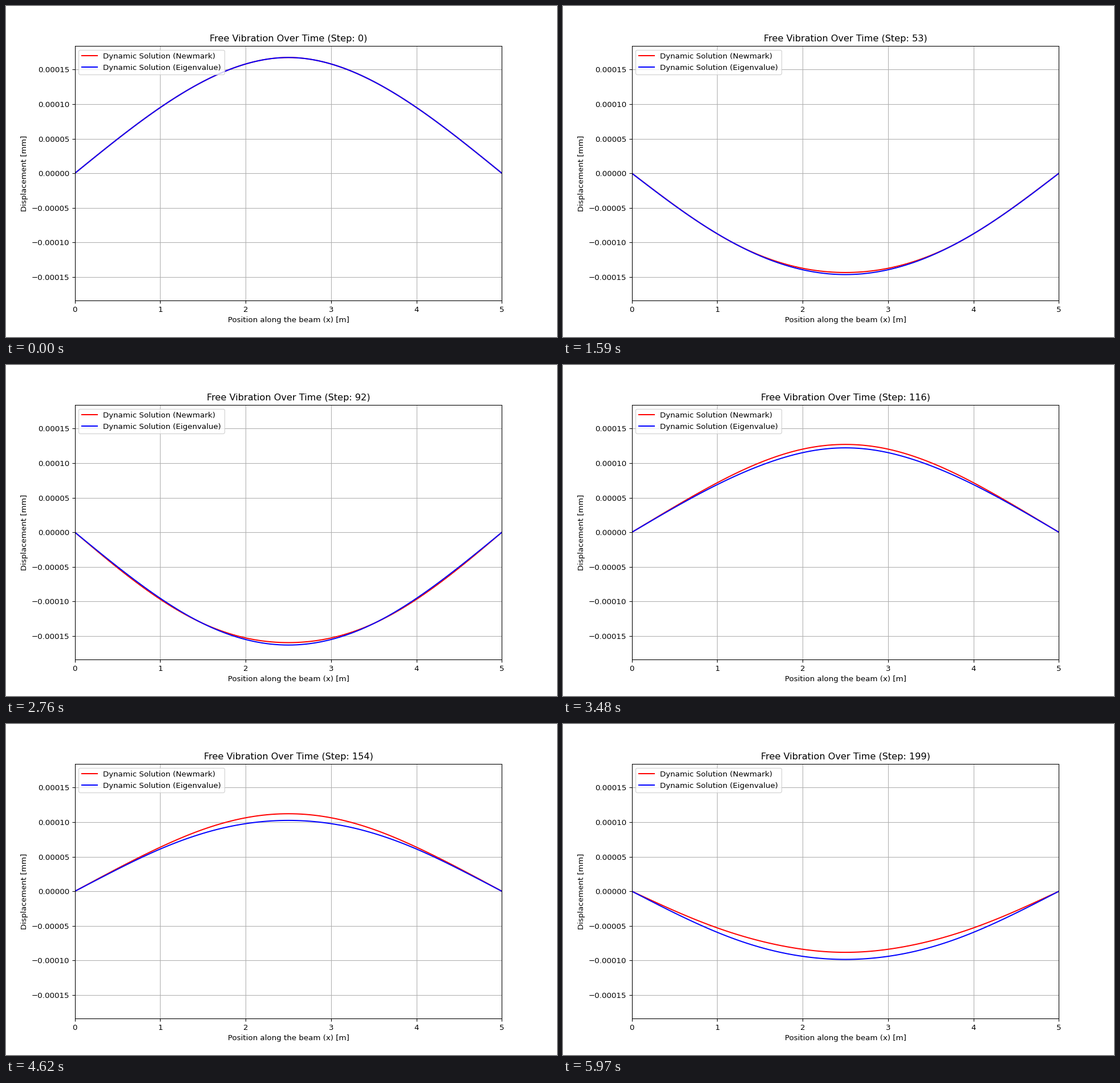
Animation, 966 px wide and 580 px high, one loop 6000 ms. Source, as a matplotlib script:

```python
import numpy as np
import matplotlib.pyplot as plt
from matplotlib.animation import FuncAnimation

plt.rcParams["font.family"] = "DejaVu Sans"

WIDTH, HEIGHT, DPI = 966, 580, 96.6
LENGTH = 5.0
PEAK = 1.675e-4      # midspan deflection under the released point load
PERIOD = 37.175      # first natural period, in time steps
STEPS = 200

x = np.linspace(0, LENGTH, 101)
modes = np.arange(1, 20, 2)

# Modal amplitudes of a simply supported beam with a midspan load
amps = PEAK * 96 / np.pi**4 * np.sin(modes * np.pi / 2) / modes**4
shapes = amps[:, None] * np.sin(np.outer(modes, np.pi * x / LENGTH))

exact = 2 * np.pi / PERIOD * modes**2
# Average-acceleration time stepping lowers each frequency
stepped = 2 * np.arctan(exact / 2)


def deflection(freqs, step):
    return np.cos(freqs * step) @ shapes


fig, ax = plt.subplots(figsize=(WIDTH / DPI, HEIGHT / DPI), dpi=DPI)
# Margins of a 10 x 6 inch layout
inch = DPI / HEIGHT
fig.subplots_adjust(bottom=0.66 * inch, top=5.28 * inch)

newmark, = ax.plot([], [], "r-", label="Dynamic Solution (Newmark)")
eigen, = ax.plot([], [], "b-", label="Dynamic Solution (Eigenvalue)")
ax.set_xlim(0, LENGTH)
ax.set_ylim(-1.1 * PEAK, 1.1 * PEAK)
ax.set_xlabel("Position along the beam (x) [m]")
ax.set_ylabel("Displacement [mm]")
title = ax.set_title("")
ax.grid(True)
ax.legend(loc="upper left")


def update(step):
    newmark.set_data(x, deflection(stepped, step))
    eigen.set_data(x, deflection(exact, step))
    title.set_text(f"Free Vibration Over Time (Step: {step})")
    return newmark, eigen, title


anim = FuncAnimation(fig, update, frames=STEPS, interval=30, repeat=True,
                     repeat_delay=0, blit=False)
plt.show()
```
